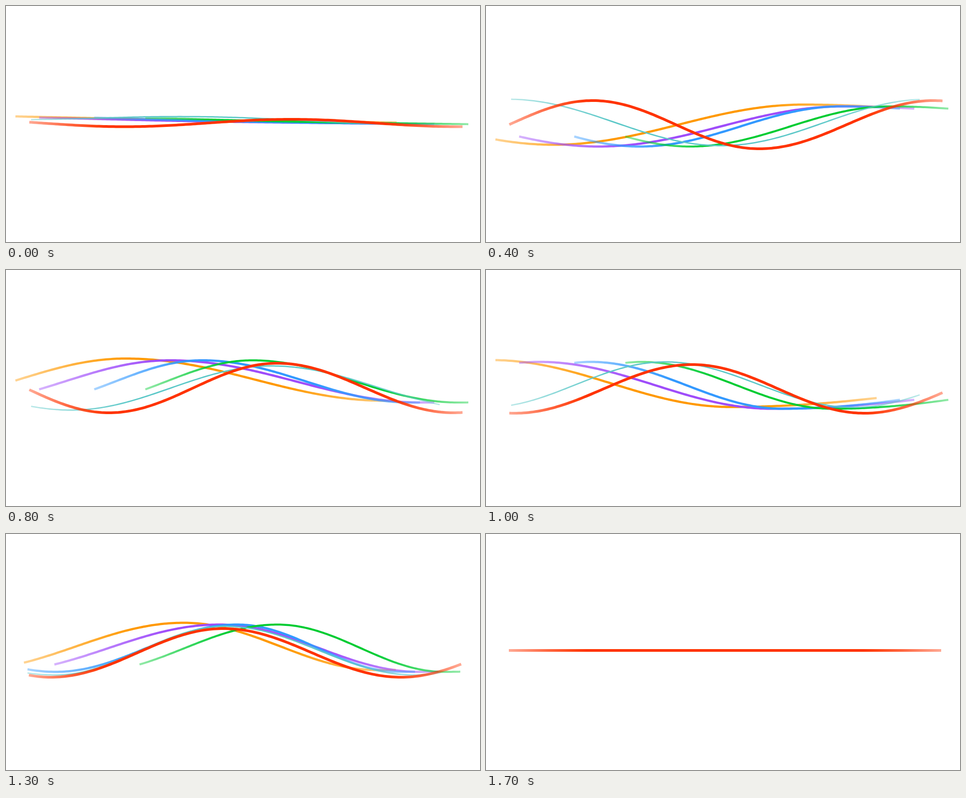
An HTML page for the animation above (1800 ms loop, 1058 by 529 pixels).

```html
<!DOCTYPE html>
<html lang="en">
<head>
<meta charset="utf-8">
<title>Waves</title>
<style>
html, body { margin: 0; width: 100%; height: 100%; overflow: hidden; background: #fff; }
svg { display: block; width: 100%; height: 100%; }
</style>
</head>
<body>
<svg id="stage" viewBox="0 0 1058 529" fill="none" stroke-linejoin="round"></svg>
<script>
const NS = 'http://www.w3.org/2000/svg';
const LOOP = 1800, STEP = 100, MID = 261;
const KEYS = [0, 400, 600, 800, 1000, 1300];
const SWELL = [1, 1.18, 0.95, 0.5, 0];   // height after the last key, per step

// A wave is a cosine through a trough, a crest and a next trough (fractions of
// the line's span), which drift from key to key. hi and lo are the heights of
// crests and troughs; before and after are half wavelengths further out.
const ribbon = {
  trough: [.45, .2, -.03, -.2, -.5, -.15],
  crest: [1.2, .82, .54, .33, .05, .43],
  next: [2.2, 2, 1.98, .97, .64, .95],
  hi: [250, 225, 198, 202.5, 206, 203],
  lo: [252.5, 315, 326, 297, 311, 309],
  before: .6, after: 1.25, tilt: 14.5
};
const thin = {
  trough: [.93, .514, .3, .098, -.061, .067],
  crest: [1.4, 1.02, .794, .586, .377, .479],
  next: [1.9, 1.5, 1.3, 1.123, .838, .935],
  hi: [244, 209, 200, 215, 206, 207],
  lo: [256, 313, 328, 314, 308, 316],
  before: .52, after: .46, tilt: 10
};
const bold = {
  trough: [.99, .577, .391, .184, .013, .051],
  crest: [1.39, .98, .794, .572, .422, .45],
  next: [1.78, 1.375, 1.19, .98, .82, .861],
  hi: [254, 212, 197, 209, 212, 212],
  lo: [270.5, 320, 332, 320, 321, 321],
  before: .385, after: .4, tilt: 0
};

// span: ends while travelling; rest: ends at the last key;
// from: visible start in both, where it is not the start of the span
const lines = [
  { wave: ribbon, color: '#ff9900', width: 5, span: [-31, 872], rest: [40, 870], from: [21, 40], fade: .3, lift: 4 },
  { wave: ribbon, color: '#9f4dfa', width: 5, span: [74, 956], rest: [108, 965], fade: .3 },
  { wave: ribbon, color: '#3399ff', width: 5, span: [197, 924], rest: [215, 913], from: [197, 48], fade: .3 },
  { wave: ribbon, color: '#00cc33', width: 4.5, span: [311, 1032], rest: [298, 1014], fade: .28 },
  { wave: thin, color: '#5cc8c8', width: 3, span: [56, 968], rest: [48, 970], fade: .25 },
  { wave: bold, color: '#ff3300', width: 6, span: [52, 1019], rest: [51, 1016], fade: .18 }
];

const mix = (a, b, k) => a + (b - a) * k;

// The wave between two keys, as a function of the place along the span.
function shapeAt(wave, key, k) {
  const at = name => mix(wave[name][key], wave[name][Math.min(key + 1, KEYS.length - 1)], k);
  const trough = at('trough'), crest = at('crest'), next = at('next');
  const hi = at('hi'), lo = at('lo');
  const tilt = key === 0 ? wave.tilt * (1 - k) : 0;
  const phase = u =>
    u < trough ? (u - trough) / wave.before :
    u < crest ? (u - trough) / (crest - trough) :
    u < next ? 1 + (u - crest) / (next - crest) :
    2 + (u - next) / wave.after;
  return u => mix(lo, hi, (1 - Math.cos(Math.PI * phase(u))) / 2) + tilt * u;
}

function add(parent, tag, attrs) {
  const el = document.createElementNS(NS, tag);
  for (const name in attrs) el.setAttribute(name, attrs[name]);
  return parent.appendChild(el);
}

const stage = document.getElementById('stage');
lines.forEach((line, i) => {
  const { color, fade, width } = line;
  line.paint = add(stage, 'linearGradient', { id: 'fade' + i, gradientUnits: 'userSpaceOnUse', y1: 0, y2: 0 });
  [[0, .42], [fade / 2, .75], [fade, 1], [1 - fade, 1], [1 - fade / 2, .75], [1, .42]]
    .forEach(([offset, alpha]) =>
      add(line.paint, 'stop', { offset, 'stop-color': color, 'stop-opacity': alpha }));
  line.path = add(stage, 'path', { stroke: `url(#fade${i})`, 'stroke-width': width });
});

function draw(ms) {
  const t = Math.floor((ms % LOOP) / STEP) * STEP;
  const last = KEYS.length - 1;
  let key = last;
  while (KEYS[key] > t) key--;
  const k = key < last ? (t - KEYS[key]) / (KEYS[key + 1] - KEYS[key]) : 0;
  const settle = key === last ? 1 : key === last - 1 ? k : 0;
  const swell = key === last ? SWELL[(t - KEYS[last]) / STEP] : 1;

  for (const { wave, span, rest, from, lift = 0, path, paint } of lines) {
    const x0 = mix(span[0], rest[0], settle);
    const x1 = mix(span[1], rest[1], settle);
    const start = from ? mix(from[0], from[1], settle) : x0;
    const shape = shapeAt(wave, key, k), count = 180;
    let d = '';
    for (let j = 0; j <= count; j++) {
      const x = mix(start, x1, j / count);
      const y = shape((x - x0) / (x1 - x0)) - lift;
      d += (j ? 'L' : 'M') + x.toFixed(1) + ' ' + mix(MID, y, swell).toFixed(2);
    }
    path.setAttribute('d', d);
    paint.setAttribute('x1', start);
    paint.setAttribute('x2', x1);
    // only the bold line stays once everything is flat
    path.setAttribute('opacity', swell || wave === bold ? 1 : 0);
  }
}

const began = performance.now();
function tick() {
  draw(performance.now() - began);
  requestAnimationFrame(tick);
}
tick();
</script>
</body>
</html>
```
